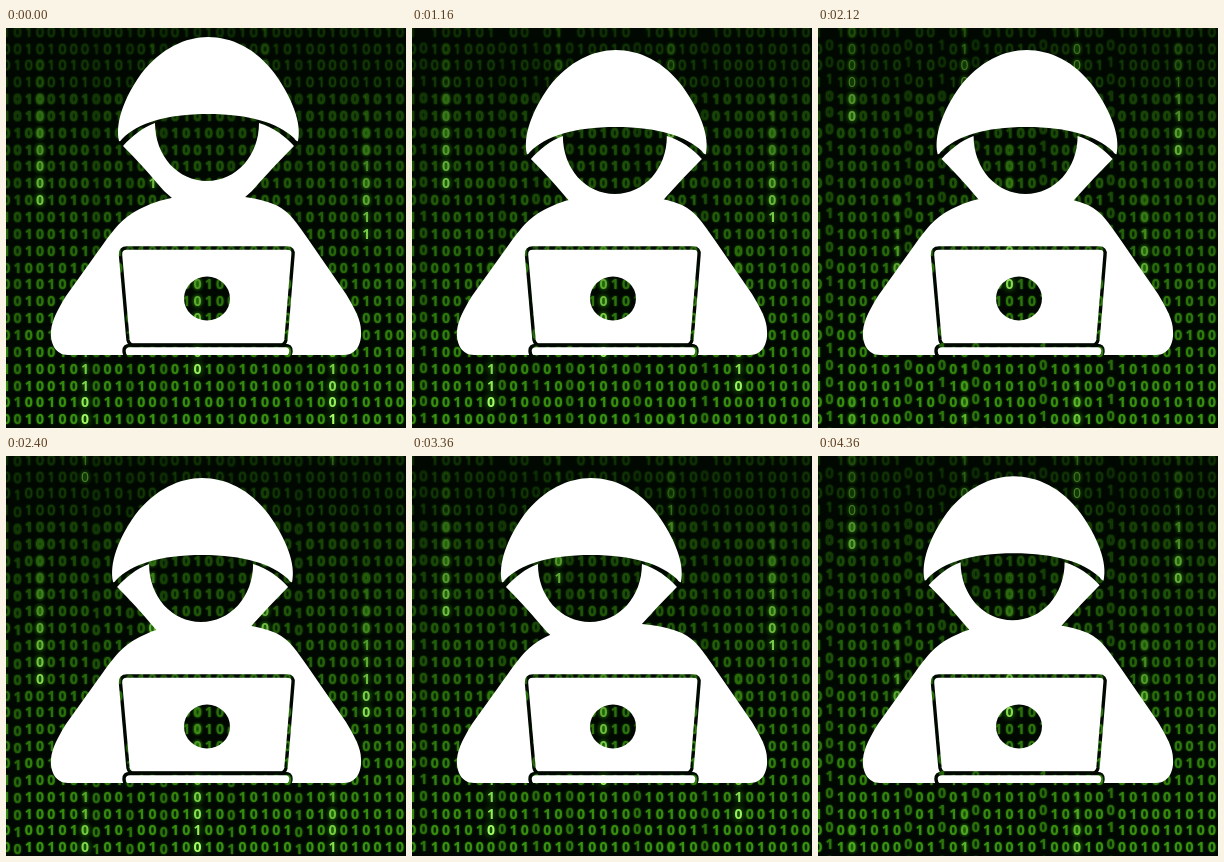
Recreate the animation shown at these times as an HTML page with a canvas. Size 400 by 400 pixels, loop 4400 ms.

```html
<!DOCTYPE html>
<html lang="en">
<head>
<meta charset="utf-8">
<title>Hooded figure and binary rain</title>
<style>
  html, body { margin: 0; width: 100%; height: 100%; overflow: hidden; background: #000; }
  canvas, svg { position: absolute; left: 0; top: 0; width: 400px; height: 400px; }
</style>
</head>
<body>
<canvas id="rain" width="400" height="400"></canvas>
<svg viewBox="0 0 400 400" fill="#fff">
  <mask id="laptop" maskUnits="userSpaceOnUse" x="0" y="0" width="400" height="400">
    <rect width="400" height="400"/>
    <g fill="none" stroke="#000" stroke-width="3.4">
      <path d="M121 220H281Q288 220 287 227L280 312Q279 317 274 317H128Q123 317 122 312L114.500 227Q114 220 121 220Z"/>
      <path d="M121 329Q118 327 118 323Q118 317.500 124 317.500H279Q285 317.500 285 323Q285 327 282 329"/>
    </g>
    <ellipse cx="201" cy="270.500" rx="23" ry="22" fill="#000"/>
  </mask>
  <g id="head">
    <path d="M113 113C109 95 118 70 135 46C155 20 180 9 202 9C225 9 250 20 269 46C286 70 296 95 292 113Q291 114 288 110C272 95 244 86 202 86C160 86 132 95 116 111Q114 114 113 113Z"/>
    <path d="M117 118C126 108 136 100 149 95C149 128 172 153 201 153C230 153 253 128 253 95C267 99 279 108 288 118Q269 137 253 155Q246 164 238 170L232 185H172L166 170Q158 164 151 155Q136 137 117 118Z"/>
  </g>
  <path id="body" d="M62 327C50 327 44 316 45 303C46 292 52 281 60 268L98 215C112 196 118 190 130 183C150 172 170 167 200 167C230 167 250 169 270 177C285 185 290 194 302 211L340 266C349 281 355 292 355 303C356 316 350 327 338 327Z" mask="url(#laptop)"/>
</svg>
<script>
const LOOP = 4400, ROW = 16.85, COL = 11.25, TRACK = 420, PERIOD = 1140, TAIL = 150;
const ctx = document.getElementById('rain').getContext('2d');
const head = document.getElementById('head');
const mod = (a, n) => ((a % n) + n) % n;

// every row reads the same motif from another place
const MOTIF = '1001010001010010';
const digit = (c, r) => MOTIF[(c + 14 + r * r * 3) % MOTIF.length];

// column -> streak position at the start
const streaks = { 3: 180, 7: 400, 13: 160, 17: 350, 23: 140, 29: 393, 32: 215 };
const sliding = [1, 8, 11, 14, 20, 26];

function drawRain(t) {
  ctx.shadowBlur = 0;
  ctx.fillStyle = '#010801';
  ctx.fillRect(0, 0, 400, 400);
  ctx.textAlign = 'center';
  ctx.textBaseline = 'middle';
  for (let c = 0; c < 36; c++) {
    const slides = sliding.includes(c);
    const shift = slides ? t / PERIOD % 1 * ROW : 0;
    for (let r = 0; r < 24; r++) {
      const y = 5 + r * ROW + shift, depth = Math.min(1, y / 390);
      const behind = c in streaks ? mod(streaks[c] + t / PERIOD * TRACK - y, TRACK) : TAIL;
      const glow = Math.max(0, 1 - behind / TAIL) * (0.35 + 0.65 * depth);
      const light = (0.3 + 0.7 * depth) * (slides ? 0.8 : 1);
      const mix = (a, b) => Math.round(a * light + (b - a * light) * glow);
      ctx.fillStyle = `rgb(${mix(58, 165)},${mix(146, 255)},${mix(14, 105)})`;
      ctx.shadowColor = glow ? '#4c1' : '#271';
      ctx.shadowBlur = 2 + 6 * glow;
      ctx.font = `${y < 60 ? 400 : 700} 14px "Open Sans", "Noto Sans", sans-serif`;
      ctx.fillText(digit(c, r), 0.25 + c * COL, y);
    }
  }
}

// smooth step from 0 to 1 between two times
function ease(t, from, to) {
  const u = Math.min(1, Math.max(0, (t - from) / (to - from)));
  return u * u * (3 - 2 * u);
}

// nod down, look right, centre, left and back
function moveHead(t) {
  const x = 14.5 * ease(t, 980, 1780) - 20.5 * ease(t, 1900, 2420)
    - 20 * ease(t, 2920, 3500) + 20 * ease(t, 3900, 4400);
  const y = 13 * ease(t, 0, 720) - 5 * ease(t, 4280, 4480);
  head.setAttribute('transform', `translate(${x} ${y})`);
}

let drawn = -1;
function frame() {
  const t = Math.floor(performance.now() % LOOP / 40) * 40;
  const step = Math.floor(t / 120);
  if (step !== drawn) drawRain((drawn = step) * 120);
  moveHead(t);
  requestAnimationFrame(frame);
}
frame();
</script>
</body>
</html>
```
